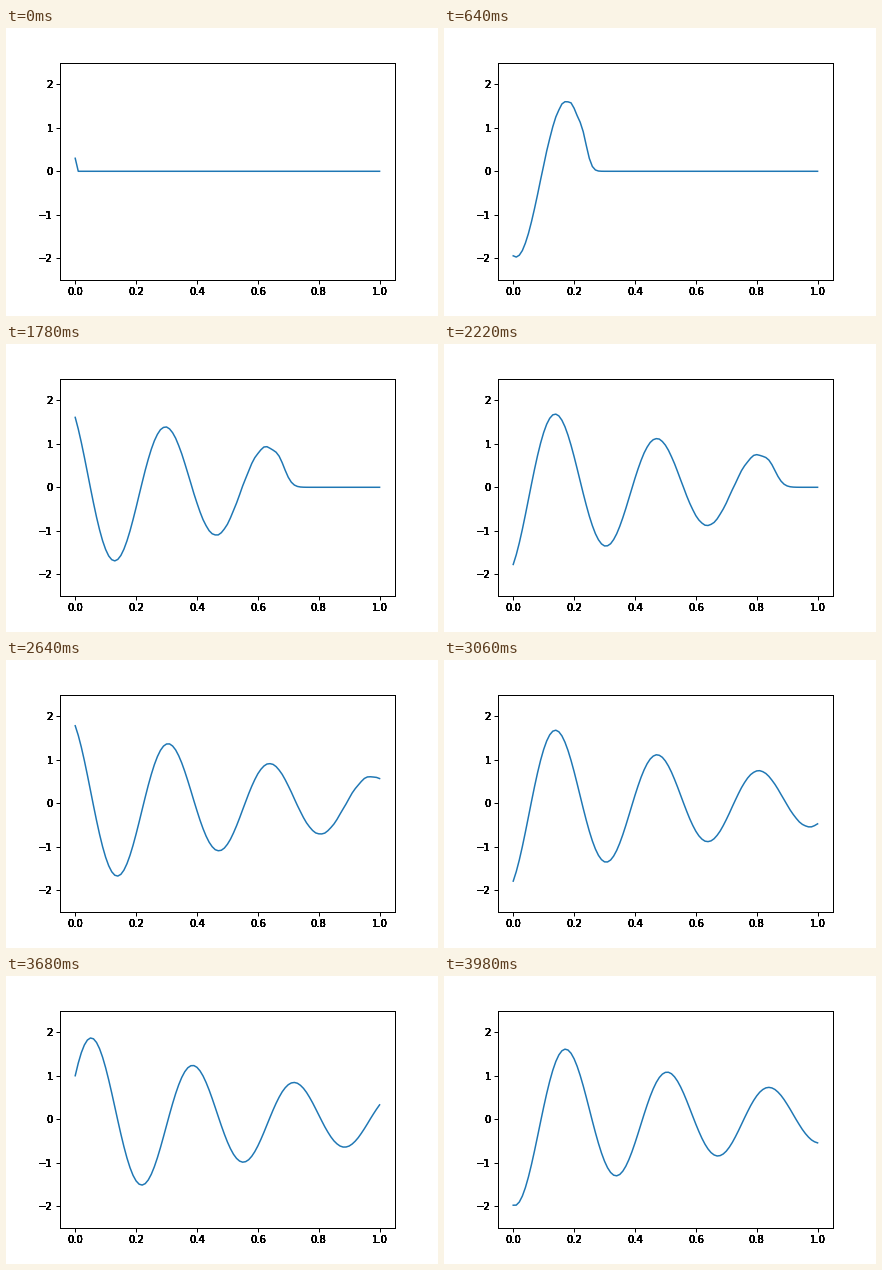
Write a matplotlib script that moves like this. It is 432 px wide and 288 px high and loops after 4000 ms.

```python
import numpy as np
import matplotlib.pyplot as plt
from matplotlib.animation import FuncAnimation
from matplotlib.transforms import offset_copy

FRAMES, INTERVAL = 200, 20
DT = DX = 0.01
SPEED, DAMPING = 0.7985, 2.0
AMPLITUDE, OMEGA = 2.0, 15.0


def solve(steps):
    """Damped wave on [0, 1], driven at the left and open at the right."""
    nu = SPEED * DT / DX
    g = DAMPING * DT / 2
    k = (nu - 1) / (nu + 1)
    prev = np.zeros(101)
    cur = np.zeros(101)
    rows = []
    for i in range(1, steps + 1):
        new = np.zeros_like(cur)
        bend = cur[2:] - 2 * cur[1:-1] + cur[:-2]
        new[1:-1] = (2 * cur[1:-1] - (1 - g) * prev[1:-1] + nu**2 * bend) / (1 + g)
        new[0] = AMPLITUDE * np.sin(OMEGA * i * DT)
        new[-1] = cur[-2] + k * (new[-2] - cur[-1])
        prev, cur = cur, new
        rows.append(new)
    return rows


def dark_label(x, y, text, trans, **align):
    # Stacked copies harden the antialiased edges
    for _ in range(10):
        ax.text(x, y, text, transform=trans, fontsize=10, color="black", **align)


plt.rcParams["font.family"] = "DejaVu Sans"
fig = plt.figure(figsize=(6, 4), dpi=72, facecolor="white")
fig.subplots_adjust(left=0.125, right=0.9, bottom=0.125, top=0.88)
ax = fig.add_subplot()
ax.set_xlim(-0.05, 1.05)
ax.set_ylim(-2.5, 2.5)
ax.set_xticks(np.linspace(0, 1, 6))
ax.set_yticks(range(-2, 3))
ax.tick_params(length=4, width=1, labelbottom=False, labelleft=False)
for spine in ax.spines.values():
    spine.set_linewidth(1)

below = offset_copy(ax.get_xaxis_transform(), fig, 0, -7, units="points")
beside = offset_copy(ax.get_yaxis_transform(), fig, -7, 0, units="points")
for v in ax.get_xticks():
    dark_label(v, 0, f"{v:.1f}", below, ha="center", va="top")
for v in ax.get_yticks():
    dark_label(0, v, f"{v:.0f}".replace("-", "\u2212"), beside,
               ha="right", va="center_baseline")

waves = solve(FRAMES)
x = np.linspace(0, 1, 101)
line, = ax.plot(x, waves[0], color="#1f77b4", lw=1.5)


def update(i):
    line.set_ydata(waves[i])
    return line,


anim = FuncAnimation(fig, update, frames=FRAMES, interval=INTERVAL,
                     repeat=True, repeat_delay=0)
plt.show()
```
